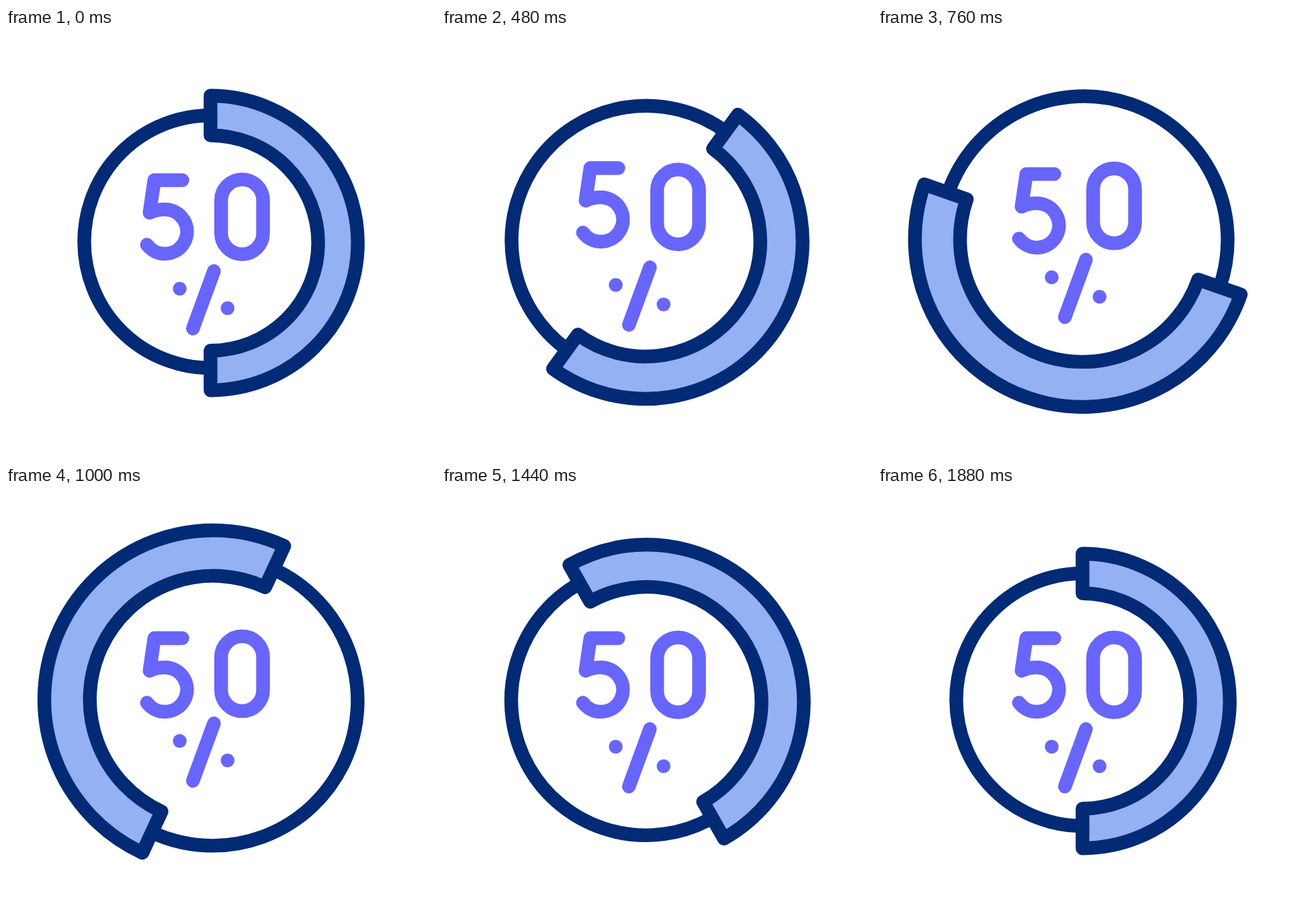
Write an HTML page that moves like this. It is 640 px wide and 640 px high and loops after 2000 ms.

```html
<!DOCTYPE html>
<html lang="en">
<head>
<meta charset="utf-8">
<title>Fifty percent</title>
<style>
  html, body { margin: 0; width: 100%; height: 100%; overflow: hidden; background: #fff; }
  svg { display: block; width: 100%; height: 100%; }
  .line { fill: none; stroke-width: 20.4; stroke-linecap: round; stroke-linejoin: round; }
  #ring { stroke: #022a75; }
  .label { stroke: #6865fb; }
  .dot { fill: #6865fb; stroke: none; }
</style>
</head>
<body>
<svg viewBox="0 0 640 640">
  <g id="ring" class="line">
    <circle cx="304.5" cy="318" r="188"/>
    <path fill="#fff" stroke="none" d="M304.5 160.3A159.7 159.7 0 0 1 304.5 479.7V539H540V100H304.5Z"/>
    <path fill="#93b1f3" d="M304.4 100.8A219.2 219.2 0 0 1 304.4 539.2V480.2A160.2 160.2 0 0 0 304.4 159.8Z"/>
  </g>
  <g class="line label">
    <path id="five" d="M262.5 226.5H220.8L213.7 275Q223 270 236.3 270A33 33 0 1 1 209.8 322.5"/>
    <rect id="zero" x="320.2" y="225.4" width="62.4" height="111.4" rx="31.2"/>
    <g id="percent">
      <path d="M309.5 361.8L278.2 447.3"/>
      <circle class="dot" cx="258.6" cy="388" r="10.3"/>
      <circle class="dot" cx="329.8" cy="417" r="10.3"/>
    </g>
  </g>
</svg>
<script>
const LOOP = 2000, STEP = 40, SPIN = 1880, STROKE = 20.4;
const ring = document.getElementById('ring');
const thin = ring.querySelector('circle');
// Replace the full circle by its left half; the band covers both ends.
thin.outerHTML = '<path d="M304.5 130A188 188 0 1 0 304.5 506"/>';
ring.children[1].remove();

const hops = [
  { el: document.getElementById('five'), delay: 0, height: 18.2 },
  { el: document.getElementById('zero'), delay: 120, height: 18.2 },
  { el: document.getElementById('percent'), delay: 240, height: 17 }
];

// Symmetric cubic-bezier(.54, 0, .46, 1), solved by bisection.
function ease(x) {
  if (x <= 0) return 0;
  if (x >= 1) return 1;
  let lo = 0, hi = 1;
  for (let i = 0; i < 24; i++) {
    const u = (lo + hi) / 2, v = 1 - u;
    const at = 3 * .54 * u * v * v + 3 * .46 * u * u * v + u * u * u;
    if (at < x) lo = u; else hi = u;
  }
  return lo * lo * (3 - 2 * lo);
}

const between = (t, from, to) => ease((t - from) / (to - from));

function draw(t) {
  const angle = 360 * between(t, 0, SPIN);
  const scale = 1 + .148 * (between(t, 40, 960) - between(t, 960, SPIN));
  ring.setAttribute('transform',
    `translate(320 320) scale(${scale}) translate(-320 -320) rotate(${angle} 307 318.3)`);
  ring.style.strokeWidth = STROKE / scale;

  for (const { el, delay, height } of hops) {
    const s = t - delay;
    const lift = height * (between(s, 40, 520) - between(s, 520, 1000));
    el.setAttribute('transform', `translate(0 ${-lift})`);
  }
}

const start = performance.now();
function tick() {
  const t = (performance.now() - start) % LOOP;
  draw(Math.min(SPIN, Math.floor(t / STEP) * STEP));
  requestAnimationFrame(tick);
}
tick();
</script>
</body>
</html>
```
